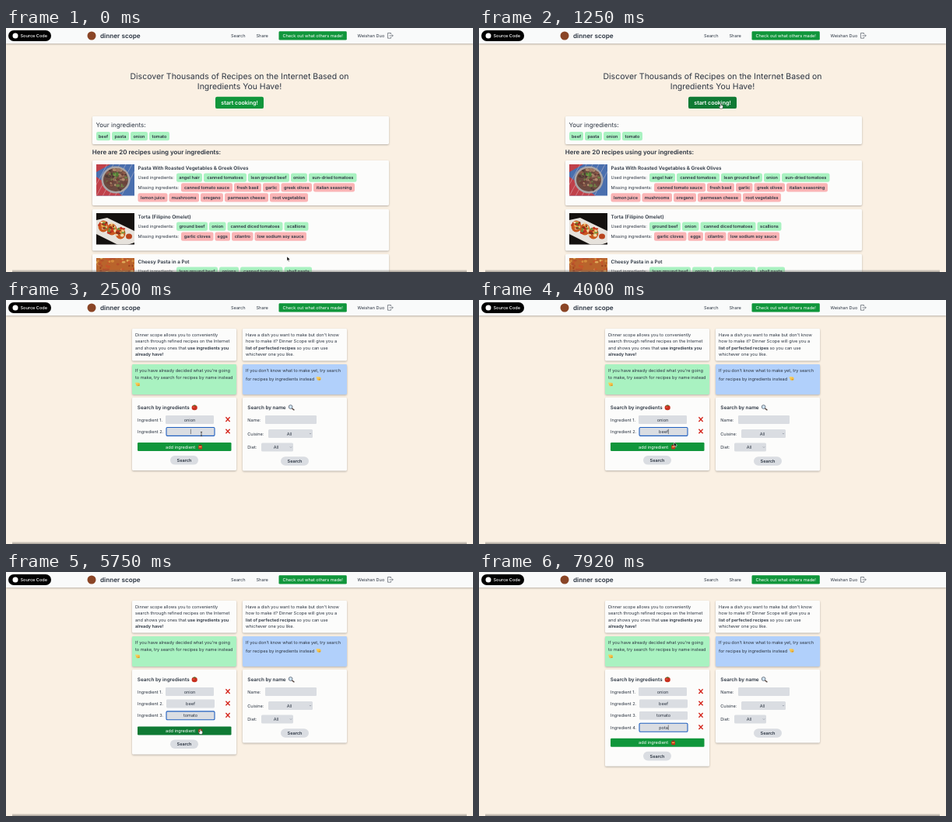
These frames come from a looping animation (600x315 px, 8 s). An HTML page:

```html
<!DOCTYPE html>
<html lang="en">
<head>
<meta charset="utf-8">
<title>Recipe search</title>
<style>
html, body { margin: 0; width: 100%; height: 100%; overflow: hidden; background: #faf0e3; }
svg { display: block; width: 100vw; height: 100vh; font-family: Inter, Roboto, sans-serif; fill: #2b3441; }
text { text-rendering: geometricPrecision; }
.b { font-weight: 600; }
.h { font-weight: 500; }
.m { text-anchor: middle; }
.w { fill: #fff; }
.card { filter: drop-shadow(0 1.1px .9px #0004); }
</style>
</head>
<body>
<svg id="stage" viewBox="0 0 600 315" preserveAspectRatio="none"></svg>
<script>
const GREEN = '#10963b', DARK = '#0f7a34', MINT = '#a9f2c1', PINK = '#fab4b5', GREY = '#dadde2', WHITE = '#fcfcfb';
const STEP = 15.4, LOOP = 8000, HOME_END = 1500;

const rect = (x, y, w, h, fill, r = 0, extra = '') =>
  `<rect x="${x}" y="${y}" width="${w}" height="${h}" rx="${r}" fill="${fill}" ${extra}/>`;
const card = (x, y, w, h, fill = WHITE, extra = '') => rect(x, y, w, h, fill, 1.4, `class="card" ${extra}`);
const text = (x, y, str, size = 5.58, cls = '', extra = '') =>
  `<text x="${x}" y="${y + size * .36}" font-size="${size}" class="${cls}" ${extra}>${str}</text>`;
const lines = (x, y, gap, list) => list.map((s, i) => text(x, y + i * gap, s)).join('');
const dot = (x, y, r, fill, ry = r) => `<ellipse cx="${x}" cy="${y}" rx="${r}" ry="${ry}" fill="${fill}"/>`;
const path = (d, stroke, width = .8, fill = 'none') =>
  `<path d="${d}" fill="${fill}" stroke="${stroke}" stroke-width="${width}"/>`;

// Row of labels; edges are left sides, the last one closes the row.
const tags = (y, fill, names, edges) => names.split(',').map((s, i) => {
  const w = edges[i + 1] - edges[i] - 2;
  return rect(edges[i], y - 5.7, w, 11.2, fill, 2.2) + text(edges[i] + w / 2, y, s, 5.58, 'b m');
}).join('');

function rng(seed) {
  return () => (seed = (seed * 16807) % 2147483647) / 2147483647;
}
function bits(seed, n, cx, cy, rx, ry, colors) {
  const rnd = rng(seed);
  let out = '';
  for (let i = 0; i < n; i++) {
    const a = rnd() * 6.28, d = Math.sqrt(rnd());
    out += dot(cx + Math.cos(a) * d * rx, cy + Math.sin(a) * d * ry, 1 + rnd() * 1.6, colors[i % colors.length], 1 + rnd());
  }
  return out;
}
const photo = (y, h, body) =>
  `<svg x="116" y="${y}" width="49" height="${h}" viewBox="0 0 49 ${h}">${body}</svg>`;

function photos() {
  let cloth = rect(0, 0, 49, 41, '#4a6fae') + `<path d="M0 10L18 0H0ZM0 16V41H34L20 30Z" fill="#c0414a"/>`;
  for (let i = 0; i < 6; i++) cloth += path(`M${i * 8 - 8} 41L${i * 8 + 14} 0`, '#e8d9dc66', 1);
  const pasta = ['#8a5a48', '#4d3a33', '#b08a6c', '#6b4038', '#9c7560', '#6f7f45'];
  const torta = [[9, 17], [20, 21], [31, 26]].map(([x, y], i) =>
    dot(x, y, 6.5, '#c9581f', 7.5) + dot(x + 1, y - 2, 4, '#e9a14a', 4.5) +
    bits(31 + i, 12, x, y - 1, 6, 7, ['#6f8f3a', '#c4321f', '#f0d9a8', '#8a2f18'])).join('');
  return photo(176, 40.5, cloth + dot(25, 20, 18.5, '#a9a6a8', 17.5) + dot(25, 20, 16, '#6b4a40', 15) +
      bits(7, 70, 25, 20, 15, 14, pasta) + bits(11, 6, 25, 13, 4, 3, ['#6f9a45', '#4f7a35'])) +
    photo(239, 40.5, rect(0, 0, 49, 41, '#14110f') + `<path d="M0 9L14 6L49 23V38L40 41H28L0 27Z" fill="#e6e2dc"/>` + torta +
      dot(42, 30, 4, '#b8431c', 3.5)) +
    photo(297, 40, rect(0, 0, 49, 41, '#b9642c') +
      bits(53, 110, 24, 16, 30, 22, ['#d48a3c', '#9c3f1c', '#e0ad5c', '#c7552a', '#b5502a']));
}

const nav = rect(0, 0, 600, 20, '#f9fafa', 0, 'class="card"') +
  rect(3, 3, 55, 14, '#000', 7) + dot(12, 10, 3.5, '#fff') + text(18.5, 10, 'Source Code', 5.58, 'w h') +
  dot(110, 10, 5.5, '#8a4526') + text(121, 10, 'dinner scope', 8.2, 'b') +
  text(289, 10, 'Search') + text(321.5, 10, 'Share') +
  rect(350.5, 4.3, 87.3, 11.3, GREEN, 1.4) + text(394.2, 10, 'Check out what others made!', 5.58, 'w m') +
  text(451.5, 10, 'Weishan Duo') +
  path('M494.5 8V6.5H490.5V13.2H494.5V11.7M492.5 9.9H497.2M495.8 8.4L497.3 9.9L495.8 11.4', '#3a424d', .6);

const recipe = (y, h, title, used, usedX) => card(111, y, 381, h) + text(169.5, y + 10, title, 6.35, 'b') +
  text(169.5, y + 22, 'Used ingredients:') + tags(y + 22.2, MINT, used, usedX);

const home = text(300, 62.5, 'Discover Thousands of Recipes on the Internet Based on', 10.48, 'm') +
  text(300, 75.5, 'Ingredients You Have!', 10.48, 'm') +
  rect(269, 88.8, 62, 15.3, GREEN, 2.2, 'id="start"') + text(300, 96.6, 'start cooking!', 7.1, 'b w m') +
  card(111, 114, 381, 36) + text(115.5, 124.8, 'Your ingredients:', 8) +
  tags(139.7, MINT, 'beef,pasta,onion,tomato', [116, 136, 160, 184, 212]) +
  text(110.8, 160.5, 'Here are 20 recipes using your ingredients:', 7.95, 'b') +
  recipe(171, 58, 'Pasta With Roasted Vegetables &amp; Greek Olives',
    'angel hair,canned tomatoes,lean ground beef,onion,sun-dried tomatoes', [219, 254, 311, 366, 389, 452.5]) +
  text(169.5, 206, 'Missing ingredients:') +
  tags(206, PINK, 'canned tomato sauce,fresh basil,garlic,greek olives,italian seasoning', [225, 293, 330, 353.5, 395, 450]) +
  tags(219, PINK, 'lemon juice,mushrooms,oregano,parmesan cheese,root vegetables', [169.5, 209.5, 250, 281, 339, 390]) +
  recipe(234, 53.5, 'Torta (Filipino Omelet)',
    'ground beef,onion,canned diced tomatoes,scallions', [219, 261, 284.5, 357.5, 390.5]) +
  text(169.5, 269, 'Missing ingredients:') +
  tags(269.2, PINK, 'garlic cloves,eggs,cilantro,low sodium soy sauce', [225, 268.5, 290, 319.5, 388]) +
  recipe(292, 40, 'Cheesy Pasta in a Pot',
    'lean ground beef,onions,canned tomatoes,shell pasta', [219, 274, 301, 357.5, 395]) +
  photos();

const bold = s => `<tspan class="b">${s}</tspan>`;
const hand = (x, y) => dot(x, y, 2.6, '#f2c04a', 2.3) + dot(x - 1.8, y - 1.6, 1.9, '#f7cf63', .9) + dot(x + 1, y + 1.2, 1.4, '#d99a2b', .8);
const tomato = (x, y) => dot(x, y, 3.6, '#c8301f', 3.2) + dot(x - 1, y - .8, 1.2, '#e4604a', .8) +
  path(`M${x - 1.8} ${y - 2.8}H${x + 1.8}M${x} ${y - 3.7}V${y - 2}`, '#3f7a2c');
const pill = (x, y) => rect(x, y - 5.8, 36, 11.6, GREY, 5.8) + text(x + 18, y, 'Search', 5.58, 'b m');
const select = (x, y, w) => rect(x, y - 5.5, w, 11, GREY, 1.5) + text(x + w / 2 - 1.5, y, 'All', 5.58, 'm') +
  path(`M${x + w - 4.2} ${y - .6}l1.2 1.2l1.2 -1.2`, '#6b7280', .5);

const row = i => {
  const y = 154.5 + i * STEP, x = i ? 206 : 205;
  return `<g id="row${i}">` + text(169, y, `Ingredient ${i + 1}.`) +
    rect(x, y - 5.4, 62, 10.9, GREY, 1.3, `id="box${i}" stroke="#1f5fc0" stroke-width="0"`) +
    text(x + 31, y, '', 5.58, 'm', `id="val${i}"`) +
    path(`M282.4 ${y - 3.2}L287.6 ${y + 2.4}M287.6 ${y - 3.2}L282.4 ${y + 2.4}`, '#d5281f', 1.4) + '</g>';
};

const search = card(162, 37, 134, 41.5) + card(304, 37, 134, 41.5) +
  lines(166, 45, 8.4, ['Dinner scope allows you to conveniently', 'search through refined recipes on the Internet',
    'and shows you ones that ' + bold('use ingredients you'), bold('already have!')]) +
  lines(308, 45, 8.4, ["Have a dish you want to make but don't know", 'how to make it? Dinner Scope will give you a',
    bold('list of perfected recipes') + ' so you can use', 'whichever one you like.']) +
  card(162, 83, 134, 39, MINT) + card(304, 83, 134, 39, '#b1d0fb') +
  lines(166, 91, 8.5, ["If you have already decided what you're going", 'to make, try search for recipes by name instead']) + hand(169.5, 109) +
  lines(308, 91, 11, ["If you don't know what to make yet, try search", 'for recipes by ingredients instead']) + hand(402, 101.5) +
  card(162, 126, 134, 78.6, WHITE, 'id="panel"') + card(304, 126, 134, 94.5) +
  text(168.8, 138.7, 'Search by ingredients', 6.35, 'b') + tomato(242.2, 139) +
  [0, 1, 2, 3].map(row).join('') +
  '<g id="tail">' + rect(169, 168.6, 120.5, 11, GREEN, 1.2, 'id="add"') +
  text(224, 174.2, 'add ingredient', 5.58, 'w m') + rect(247.2, 172, 4.8, 5, '#c8321f', 1.2) +
  rect(248, 173.5, 3.2, 1.3, '#e9b04a') + dot(249.6, 171.8, 1.8, '#6b3a22', .7) +
  pill(211, 191.4) + '</g>' +
  text(310.3, 138.7, 'Search by name', 6.35, 'b') +
  path('M367.3 139.7L370.4 142.3', '#4a3a34', 1.3) + path('M368 138a2.4 2.4 0 1 1-4.8 0a2.4 2.4 0 1 1 4.8 0', '#5b6470', .8, '#cfe3f2') +
  text(310.3, 154.5, 'Name:') + rect(333, 149, 66, 11, GREY, 1.3) +
  text(310.3, 172.5, 'Cuisine:') + select(337, 172.5, 57) +
  text(310.3, 190, 'Diet:') + select(328, 190, 41) + pill(353, 208) +
  '<path id="caret" stroke="#222" stroke-width=".5"/>';

const pointer = '<g id="pointer">' +
  `<g id="arrow">${path('M0 0V5.6L1.3 4.4L2.2 6.4L3.1 6L2.3 4.1H4Z', '#fff', .5, '#000')}</g>` +
  `<g id="finger">${path('M-.6 .4Q0 -.5 .6 .4V2.4L3 3V5.2L2.3 7H-.8L-2.4 4.4Q-2.2 3.4 -.6 4.4Z', '#111', .5, '#fff')}</g>` +
  `<g id="beam">${path('M-1.1 -2.8L0 -2.3L1.1 -2.8M0 -2.3V2.3M-1.1 2.8L0 2.3L1.1 2.8', '#222', .7)}</g></g>`;

const edge = '<linearGradient id="edge" x2="0" y2="1"><stop stop-color="#6b6762" stop-opacity="0"/>' +
  '<stop offset="1" stop-color="#6b6762" stop-opacity=".6"/></linearGradient>' +
  rect(8, 311.5, 584, 3.5, 'url(#edge)');

document.getElementById('stage').innerHTML = rect(0, 0, 600, 315, '#faf0e3') +
  `<g id="home">${home}</g><g id="search">${search}</g>${nav}${edge}${pointer}`;

const $ = id => document.getElementById(id);
const show = (id, on) => $(id).setAttribute('visibility', on ? 'inherit' : 'hidden');
const inside = (p, x, y, w, h) => p.x > x && p.x < x + w && p.y > y && p.y < y + h;

// word, focus time, first key, gap between keys, pointer back in view
const fields = [
  ['onion', 1750, 1800, 60, 2080],
  ['beef', 2250, 2700, 300, 3800],
  ['tomato', 4400, 4750, 90, 5500],
  ['pota', 6950, 7500, 120, 9000]
];
const track = [
  [0, 361, 295], [150, 361, 295], [1100, 310.5, 97], [1540, 310.5, 97], [1730, 251, 155], [2080, 251, 155],
  [2190, 251, 173], [3800, 251, 173], [4000, 250.5, 183.6], [4150, 251, 188.6], [5500, 251, 188.6], [5800, 249.5, 203.5], [LOOP, 249.5, 203.5]
];

function pointerAt(t) {
  const i = Math.max(1, track.findIndex(k => k[0] > t));
  const [t0, x0, y0] = track[i - 1], [t1, x1, y1] = track[i];
  let k = (t - t0) / (t1 - t0);
  k = k * k * (3 - 2 * k);
  return { x: x0 + (x1 - x0) * k, y: y0 + (y1 - y0) * k };
}

function draw(t) {
  const onHome = t < HOME_END, p = pointerAt(t);
  const count = Math.max(1, fields.filter(f => t >= f[1]).length), last = count - 1, shift = last * STEP;
  show('home', onHome);
  $('search').setAttribute('display', onHome ? 'none' : 'inline');

  const hidden = fields.some(f => t >= f[2] && t < f[4]);
  const overStart = onHome && inside(p, 269, 89, 62, 15);
  const overAdd = !onHome && !hidden && inside(p, 169, 168.9 + shift, 120.5, 10.7);
  const overBox = !onHome && inside(p, 205, 148.8 + shift, 63, 11.6);
  $('start').setAttribute('fill', overStart ? DARK : GREEN);
  $('add').setAttribute('fill', overAdd ? DARK : GREEN);
  $('panel').setAttribute('height', 78.6 + shift);
  $('tail').setAttribute('transform', `translate(0 ${shift})`);

  fields.forEach(([word, focus, start, gap], i) => {
    const typed = Math.min(word.length, Math.max(0, Math.floor((t - start) / gap) + 1));
    const focused = i === last && t >= focus;
    $('row' + i).setAttribute('display', i < count ? 'inline' : 'none');
    $('val' + i).textContent = word.slice(0, typed);
    $('box' + i).setAttribute('stroke-width', focused ? 1.1 : 0);
    if (i !== last) return;
    const since = t - (typed ? start + (typed - 1) * gap : focus);
    const half = typed && !onHome ? $('val' + i).getComputedTextLength() / 2 : 0;
    $('caret').setAttribute('d', `M${(i ? 237 : 236) + half + .4} ${151.3 + shift}v6.4`);
    show('caret', focused && since % 1000 < 500);
  });

  $('pointer').setAttribute('transform', `translate(${p.x} ${p.y})`);
  show('pointer', !hidden);
  const kind = overStart || overAdd ? 'finger' : overBox ? 'beam' : 'arrow';
  for (const id of ['arrow', 'finger', 'beam']) $(id).setAttribute('display', id === kind ? 'inline' : 'none');
}

const begin = performance.now();
function tick() {
  draw((performance.now() - begin) % LOOP);
  requestAnimationFrame(tick);
}
tick();
</script>
</body>
</html>
```
